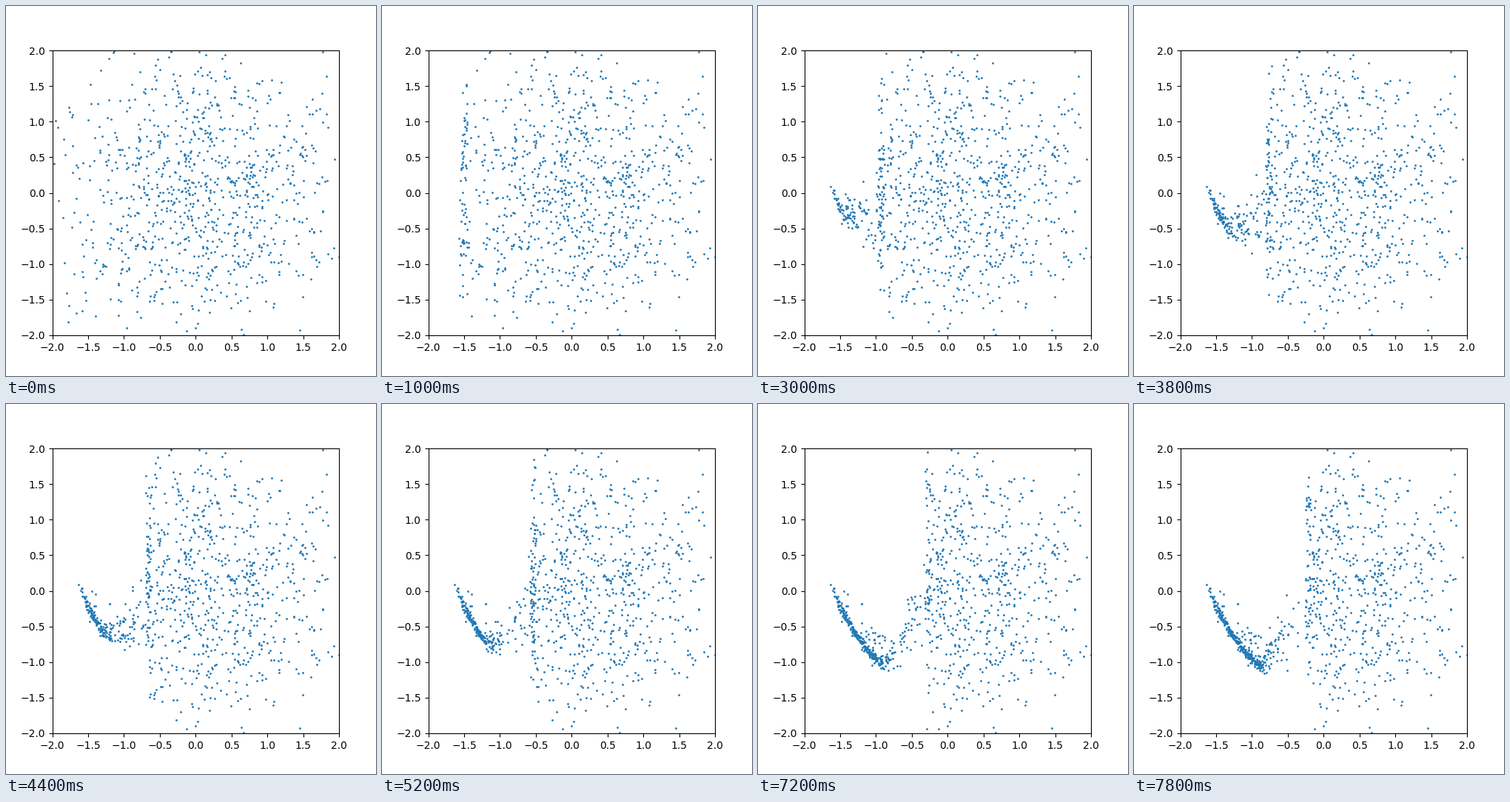
These frames come from a looping animation (500 px wide and 500 px high, 8 s). A matplotlib script:

```python
import numpy as np
import matplotlib.pyplot as plt
from matplotlib.animation import FuncAnimation

FRAMES, INTERVAL, HOLD = 40, 200, 2
COUNT = 1000
START, BAND = -1.8, 0.08
EASE_IN, FLIGHT = 3.0, 8.0


def front(step):
    """Left edge of the swept column, slowing as it moves right."""
    return START + np.log1p(step / 10)


def front_step(x):
    """Step at which the front reaches x."""
    return 10 * np.expm1(np.maximum(x - START, 0))


rng = np.random.default_rng(3)
x0, y0 = rng.normal(size=(2, COUNT))

# Each point is caught by the front, rides it, then flies to the curve;
# low points let go first
caught = front_step(x0 - BAND)
ride = np.clip(6.5 + 2.5 * y0 + rng.normal(0, 1, COUNT), 2, 10)
offset = rng.uniform(0, BAND, COUNT)
release = caught + ride
release_y = 0.35 * y0 - 0.2

# The curve fills from its upper left end downwards
filled = np.clip((release + FLIGHT - 12) / 23, 0, 1.1)
goal_x = -1.53 + 0.6 * filled + rng.normal(0, 0.05, COUNT)
d = goal_x + 1.55
goal_y = -0.12 - 1.767 * d + d * (d - 0.3) + rng.normal(0, 0.04, COUNT)
stray = rng.random(COUNT) < 0.12
goal_x += stray * rng.uniform(0, 0.2, COUNT)
goal_y += stray * rng.uniform(-0.1, 0.3, COUNT)


def positions(step):
    age = step - caught
    pull = np.clip(age / EASE_IN, 0, 1)
    held = front(np.minimum(step, release)) + offset
    x = x0 + (held - x0) * pull
    y = y0 + (release_y - y0) * np.clip(age / ride, 0, 1) ** 2
    fly = 1 - (1 - np.clip((step - release) / FLIGHT, 0, 1)) ** 1.6
    return x + (goal_x - x) * fly, y + (goal_y - y) * fly


fig, ax = plt.subplots(figsize=(5, 5), dpi=100)
ax.set(xlim=(-2, 2), ylim=(-2, 2))
dots, = ax.plot(*positions(0), "o", markersize=1, color="C0")


def update(frame):
    dots.set_data(*positions(max(0, frame - HOLD)))
    return dots,


anim = FuncAnimation(fig, update, frames=FRAMES, interval=INTERVAL,
                     repeat=True, repeat_delay=0)
plt.show()
```
